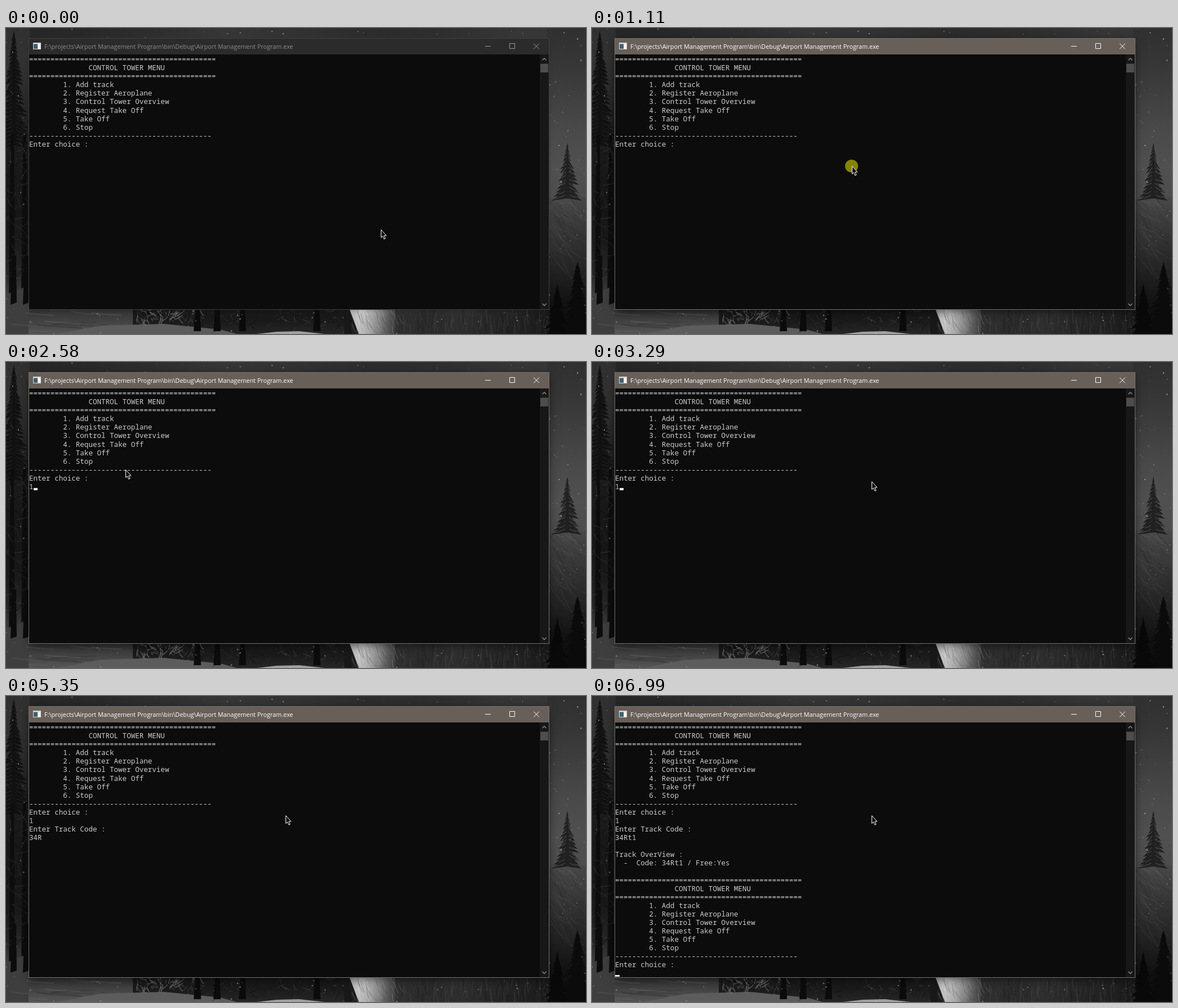
An HTML page with a canvas for the animation above (8 s loop, 1029x544 px).

```html
<!DOCTYPE html>
<html lang="en">
<head>
<meta charset="utf-8">
<title>Control tower console</title>
<style>
  html, body { margin: 0; width: 100%; height: 100%; overflow: hidden; background: #222; }
  #stage { position: absolute; left: 0; top: 0; width: 1029px; height: 544px; overflow: hidden; }
  #stage > * { position: absolute; }
  #win {
    left: 40px; top: 18px; width: 922px; height: 481px;
    border: 1px solid #414141; background: #0c0c0c;
    box-shadow: 0 2px 9px -5px rgba(0, 0, 0, .6);
  }
  #bar { height: 28px; background: #2b2b2b; color: #8c8c8c; }
  #win.on { border-color: #77706b; box-shadow: 0 4px 18px -4px rgba(0, 0, 0, .75); }
  .on #bar { background: #685f59; color: #fff; }
  #name {
    position: absolute; left: 27px; top: 0; line-height: 28px; white-space: pre;
    font-family: "Open Sans", "Noto Sans", sans-serif; font-size: 10.83px;
  }
  #win svg { position: absolute; left: 0; top: 0; }
  #out {
    left: 41px; top: 48.1px; margin: 0; color: #ccc;
    font: 12.556px/15.08px "Noto Sans Mono", "DejaVu Sans Mono", monospace;
    font-variant-ligatures: none;
  }
  #caret { width: 7.5px; height: 3.7px; background: #f2f2f2; }
  #spot { left: 449px; top: 234px; width: 23px; height: 23px; border-radius: 50%; background: #848400; }
  #mouse { left: 0; top: 0; overflow: visible; }
</style>
</head>
<body>
<div id="stage">
  <canvas id="photo" width="1029" height="544"></canvas>
  <div id="win">
    <div id="bar"><span id="name">F:\projects\Airport Management Program\bin\Debug\Airport Management Program.exe</span></div>
    <svg width="922" height="481" viewBox="41 19 922 481" fill="none">
      <rect x="48" y="26" width="14" height="12" fill="#d8d8d8"/>
      <rect x="49" y="28.5" width="7" height="8.5" fill="#3f6070"/>
      <rect x="57" y="28.5" width="4" height="8.5" fill="#f4f4f4"/>
      <g id="buttons" stroke="#999">
        <path d="M850 32.5H860M893.5 27.5H902.5V36.5H893.5ZM936.2 27.7L945.8 37.3M945.8 27.7L936.2 37.3"/>
      </g>
      <rect x="947" y="47" width="16" height="453" fill="#171717"/>
      <rect x="948" y="63.5" width="14" height="15.5" fill="#4d4d4d"/>
      <path d="M951.5 57.3L955 53.8L958.5 57.3M951.5 490L955 493.5L958.5 490" stroke="#8a8a8a" stroke-width="1.4"/>
    </svg>
  </div>
  <pre id="out"></pre>
  <div id="caret"></div>
  <div id="spot"></div>
  <svg id="mouse" width="12" height="19">
    <path d="M.5 .7V14.6L3.5 11.9L5.7 17.2L8 16.2L5.8 11H9.8Z" fill="#0a0a0a" stroke="#fff"/>
  </svg>
</div>
<script>
const $ = id => document.getElementById(id);

// ---- Backdrop: a dark snowy forest in broad tones ----
function paintPhoto() {
  const c = $('photo').getContext('2d');
  let seed = 11;
  const rnd = (a = 0, b = 1) => {
    seed = (seed * 16807) % 2147483647;
    return a + (b - a) * seed / 2147483647;
  };
  const grey = (v, a = 1) => `rgba(${v},${v},${v},${a})`;
  const fade = (x, y, w, h, x2, y2, tones) => {
    const g = c.createLinearGradient(x, y, x2, y2);
    tones.forEach((v, i) => g.addColorStop(i / (tones.length - 1), grey(v)));
    c.fillStyle = g;
    c.fillRect(x, y, w, h);
  };
  const poly = (v, pts) => {
    c.fillStyle = grey(v);
    c.beginPath();
    for (let i = 0; i < pts.length; i += 2) c.lineTo(pts[i], pts[i + 1]);
    c.fill();
  };
  const line = (x, y, dx, dy, v, a, w = 1) => {
    c.strokeStyle = grey(v, a);
    c.lineWidth = w;
    c.beginPath();
    c.moveTo(x, y);
    c.quadraticCurveTo(x + dx * .4, y + dy * .7, x + dx, y + dy);
    c.stroke();
  };
  const pine = (x, top, foot, half, v, snow) => {
    for (let y = top; y < foot; y += 7) {
      const r = half * (.15 + .85 * (y - top) / (foot - top));
      poly(v, [x, y - 9, x + r * rnd(.7, 1.1), y + 10, x, y + 6, x - r * rnd(.7, 1.1), y + 10]);
      for (const s of [-1, 1])
        if (snow) line(x + s * r * .15, y, s * r * rnd(.4, .8), rnd(4, 9), snow, .55, 1.3);
    }
  };

  fade(0, 0, 1029, 20, 1029, 0, [38, 40, 46, 54, 50, 44, 46, 54, 56]);
  fade(960, 0, 69, 310, 960, 310, [48, 54, 64, 74, 80, 76]);
  fade(960, 300, 69, 244, 960, 544, [72, 58, 44, 30, 16, 12]);
  fade(0, 0, 42, 544, 0, 544, [48, 50, 44, 34, 27, 24, 22, 26, 38, 70, 76]);
  fade(0, 498, 250, 46, 0, 544, [48, 66, 86]);
  fade(225, 498, 400, 46, 225, 544, [22, 26, 38]);

  // left trees, trunks and twigs
  pine(14, 14, 205, 32, 17, 52);
  for (const x of [8, 30]) poly(13, [x, 190, x + 6, 190, x + 8, 490, x - 3, 490]);
  for (let i = 0; i < 75; i++) line(rnd(0, 40), rnd(200, 440), rnd(-24, 24), rnd(-14, 26), rnd(5, 72), .6);
  poly(62, [0, 474, 40, 458, 40, 544, 0, 544]);
  for (const x of [11, 33]) poly(12, [x, 405, x + 7, 405, x + 8, 488, x - 3, 492]);

  // snow field and undergrowth
  for (let i = 0; i < 22; i++) line(rnd(0, 190), rnd(500, 542), rnd(30, 80), rnd(-4, 6), rnd(30, 120), .35, 2);
  poly(92, [90, 544, 170, 529, 280, 526, 380, 536, 410, 544]);
  for (let i = 0; i < 110; i++) line(rnd(228, 345), rnd(499, 520), rnd(-12, 12), rnd(2, 12), rnd(5, 165), .6, 1.3);
  for (let i = 0; i < 80; i++) line(rnd(350, 606), rnd(499, 534), rnd(-16, 16), rnd(-7, 12), rnd(5, 90), .6);
  for (const x of [336, 371, 416, 548]) poly(11, [x, 499, x + 8, 499, x + 10, 539, x - 3, 539]);
  poly(160, [445, 544, 480, 540, 520, 539, 565, 544]);

  // pale to dark fur along the bottom and right
  fade(606, 499, 90, 45, 702, 520, [165, 202, 160, 92, 46]);
  fade(690, 499, 275, 45, 965, 499, [48, 42, 46, 38, 34, 24]);
  poly(24, [600, 499, 609, 499, 626, 544, 600, 544]);
  for (let i = 0; i < 65; i++) line(rnd(610, 698), rnd(496, 530), rnd(2, 14), rnd(12, 26), rnd(45, 225), .3);
  for (let i = 0; i < 170; i++) line(rnd(690, 962), rnd(494, 534), rnd(-7, 6), rnd(14, 30), rnd(14, 92), .38);
  for (let i = 0; i < 70; i++) line(rnd(958, 1005), rnd(285, 420), rnd(18, 38), rnd(12, 44), rnd(22, 115), .35);

  // right trees
  pine(996, 213, 300, 28, 32, 108);
  pine(1014, 425, 544, 36, 11, 0);
  pine(978, 462, 544, 28, 9, 0);

  // snowfall
  for (let i = 0; i < 620; i++) {
    const x = rnd(0, 1029), y = rnd(0, 544), r = rnd(.35, 1.25);
    c.fillStyle = grey(215, rnd(.2, .75));
    c.beginPath();
    c.arc(x, y, r, 0, 7);
    c.fill();
  }
}

// ---- Console text ----
const menu = [
  '='.repeat(44),
  ' '.repeat(14) + 'CONTROL TOWER MENU',
  '='.repeat(44),
  ...['Add track', 'Register Aeroplane', 'Control Tower Overview', 'Request Take Off', 'Take Off', 'Stop']
    .map((s, i) => `${' '.repeat(8)}${i + 1}. ${s}`),
  '-'.repeat(43),
  'Enter choice :'
].join('\n');

const screenText = s => {
  let text = menu + '\n' + s.choice;
  if (s.asked) text += '\nEnter Track Code :\n' + s.code;
  if (s.done) text += `\n\nTrack OverView :\n  -  Code: ${s.code} / Free:Yes\n\n${menu}`;
  return text;
};

// ---- Timeline: each step changes part of the state ----
const loop = 8000;
const start = { at: [665, 358], on: false, spot: false, choice: '', asked: false, code: '', done: false, caret: null };
const steps = [
  [70, { at: [638, 337] }],
  [580, { at: [520, 278] }],
  [650, { at: [461, 245] }],
  [1110, { on: true, spot: true }],
  [1340, { spot: false }],
  [1650, { at: [385, 228], caret: [11, 0] }],
  [1720, { at: [270, 203] }],
  [1800, { at: [212, 191] }],
  [2200, { caret: null }],
  [2580, { choice: '1', caret: [11, 1] }],
  [2730, { caret: null }],
  [3130, { at: [265, 195] }],
  [3210, { at: [405, 206] }],
  [3290, { at: [496, 212], caret: [11, 1] }],
  [3520, { asked: true, caret: [13, 0] }],
  [4280, { caret: null }],
  [4530, { code: '3', caret: [13, 1] }],
  [4620, { code: '34', caret: [13, 2] }],
  [4780, { caret: null }],
  [5180, { code: '34R', caret: [13, 3] }],
  [5350, { caret: null }],
  [5810, { code: '34Rt', caret: [13, 4] }],
  [6370, { code: '34Rt1', caret: [13, 5] }],
  [6450, { caret: null }],
  [6910, { caret: [13, 5] }],
  [6990, { done: true, caret: [29, 0] }]
];

let shown = -1;
function render(t) {
  const count = steps.filter(([at]) => at <= t).length;
  if (count === shown) return;
  shown = count;
  const s = Object.assign({}, start, ...steps.slice(0, count).map(p => p[1]));
  $('win').className = s.on ? 'on' : '';
  $('buttons').setAttribute('stroke', s.on ? '#fff' : '#999');
  $('out').textContent = screenText(s);
  $('spot').style.display = s.spot ? 'block' : 'none';
  $('mouse').style.transform = `translate(${s.at[0]}px, ${s.at[1]}px)`;
  const caret = $('caret').style;
  caret.display = s.caret ? 'block' : 'none';
  if (s.caret) {
    caret.top = 58.4 + 15.08 * s.caret[0] + 'px';
    caret.left = 41 + 7.534 * s.caret[1] + 'px';
  }
}

paintPhoto();
render(0);
const t0 = performance.now();
(function tick() {
  render((performance.now() - t0) % loop);
  requestAnimationFrame(tick);
})();
</script>
</body>
</html>
```
